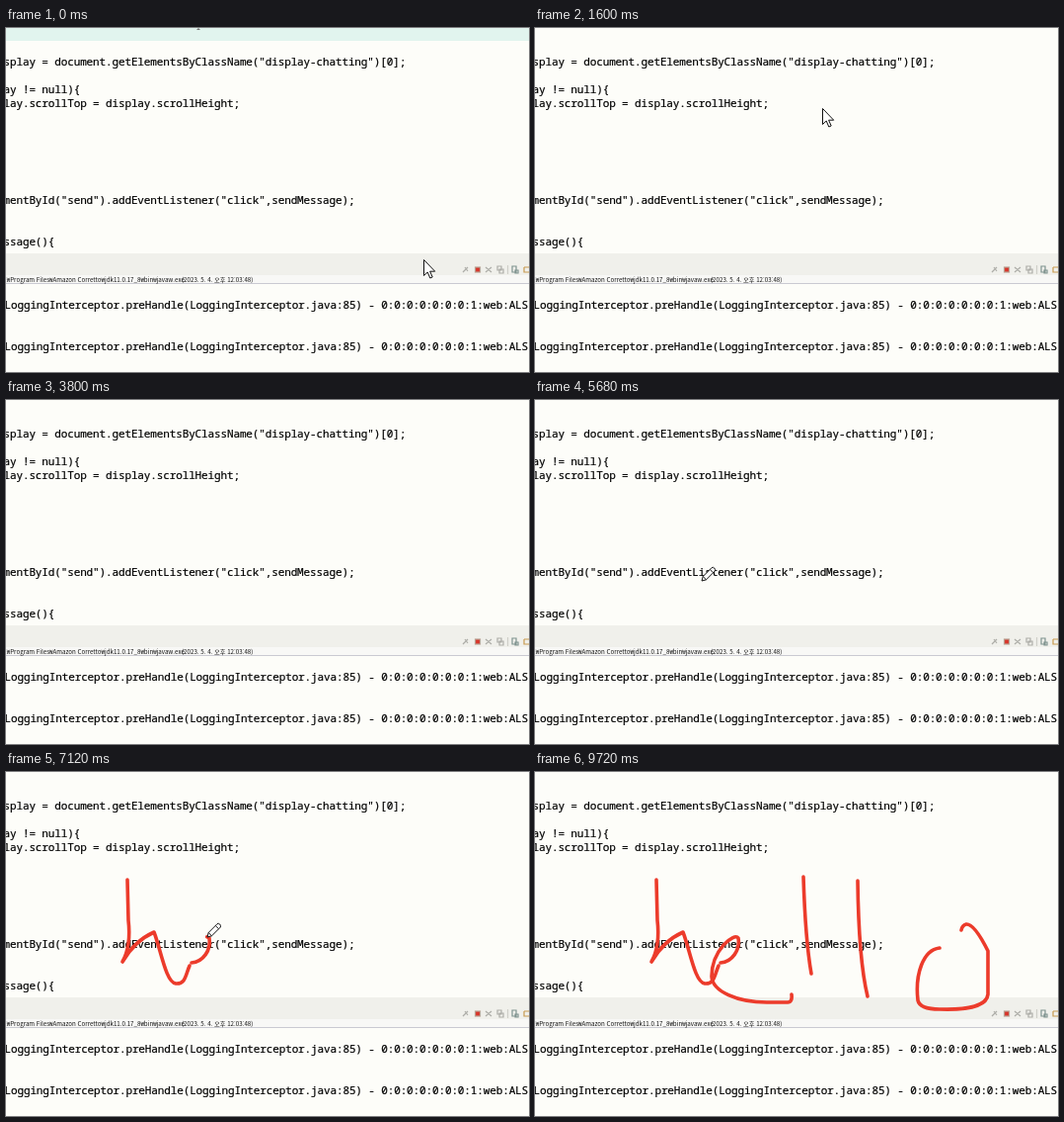
An HTML page that plays this animation: 530x348 px, repeating every 9.84 s.

```html
<!DOCTYPE html>
<html lang="ko">
<head>
<meta charset="utf-8">
<title>Writing over code</title>
<style>
  html, body { margin: 0; width: 100%; height: 100%; overflow: hidden; background: #fdfdf9; }
  svg { display: block; width: 530px; height: 348px; }
  text { white-space: pre; }
  .code { font: 11px "Noto Sans Mono", "DejaVu Sans Mono", monospace; letter-spacing: -.13px; stroke: #000; stroke-width: .2px; }
  .launch { font: 6.2px "Noto Sans CJK KR", "Noto Sans", sans-serif; fill: #111; }
  .ink { fill: none; stroke: #ec3b2b; stroke-width: 3.6; stroke-linecap: round; stroke-linejoin: round; }
  .pointer { fill: #fff; stroke: #111; stroke-linejoin: round; }
</style>
</head>
<body>
<svg viewBox="0 0 530 348">
  <g id="band">
    <rect width="530" height="13" fill="#e1f4ee"/>
    <path d="M193 2l2-2 2 2z" fill="#777"/>
  </g>

  <g class="code">
    <text x="-2.5" y="38">splay = document.getElementsByClassName("display-chatting")[0];</text>
    <text x="-2.5" y="66">ay != null){</text>
    <text x="-2.5" y="80">lay.scrollTop = display.scrollHeight;</text>
    <text x="-2.5" y="178">mentById("send").addEventListener("click",sendMessage);</text>
    <text x="-2.5" y="220">ssage(){</text>
  </g>

  <rect y="228" width="530" height="22" fill="#f0f0eb"/>
  <rect y="250" width="530" height="8" fill="#f8f8f6"/>
  <path d="M0 258.5H530" stroke="#cacad2"/>
  <g class="launch">
    <text x="-1" y="257">:₩Program Files₩Amazon Corretto₩jdk11.0.17_8₩bin₩javaw.exe</text>
    <text x="178" y="257">(2023. 5. 4. 오후 12:03:48)</text>
  </g>
  <g fill="none" stroke="#adada8" stroke-width="1.2">
    <path d="M463 247l5-5M465 242l3 4"/>
    <rect x="475.5" y="242" width="5" height="5" fill="#d8352a" stroke="#b9a294"/>
    <path d="M486 242l6 5M492 242l-6 5M498 241h4v4h-4zM500 244h4v4h-4z"/>
    <path d="M508.500 240v9" stroke="#cfcfc8"/>
    <path d="M513 241h4v6h-4zM516 245h3v3h-3z" stroke="#7f938f"/>
    <path d="M525 242h6M525 242v5h6" stroke="#c79a50"/>
  </g>

  <g class="code">
    <text x="-1.5" y="284">LoggingInterceptor.preHandle(LoggingInterceptor.java:85) - 0:0:0:0:0:0:0:1:web:ALS</text>
    <text x="-1.5" y="326">LoggingInterceptor.preHandle(LoggingInterceptor.java:85) - 0:0:0:0:0:0:0:1:web:ALS</text>
  </g>

  <!-- h, e, l, l, o -->
  <g class="ink">
    <path data-start="6240" data-end="6960" d="M123 109L124 150Q127 176 118 192Q130 171 150 162C157 180 162 213 172 214S182 205 186 196"/>
    <path data-start="7040" data-end="7440" d="M188 193C200 192 208 180 206 168C202 162 179 180 179 207C180 222 205 233 235 233H256Q261 233 260 225"/>
    <path data-start="7560" data-end="7680" d="M272 106Q274 170 280 204"/>
    <path data-start="7800" data-end="7960" d="M327 110Q328 190 337 227"/>
    <path data-start="8240" data-end="8800" d="M410 178C393 180 385 205 388 231Q390 240 410 240C440 241 458 236 459 225V181Q445 153 437 154Q433 155 432 160"/>
  </g>

  <path id="arrow" class="pointer" d="M.5 .5V16.500L4.200 13L6.800 19L9.200 18L6.600 12.200H11.700Z"/>
  <g id="pencil" class="pointer">
    <path d="M0 0L1.200-4.500L10-13.300Q11.500-14.300 12.700-13Q14-11.500 13.300-10L4.500-1.200Z"/>
    <path d="M8.300-11.500L11.500-8.300M1.200-4.500L4.500-1.200" fill="none"/>
  </g>
</svg>
<script>
const LOOP = 9840, TICK = 40;
const $ = id => document.getElementById(id);
const clamp = v => Math.min(1, Math.max(0, v));

const strokes = [...document.querySelectorAll(".ink path")].map(path => ({
  path, start: +path.dataset.start, end: +path.dataset.end, length: path.getTotalLength()
}));

function pointOn({ path, length }, f) {
  const { x, y } = path.getPointAtLength(length * f);
  return [x, y];
}

// The arrow sweeps in wide loops between two straight stretches.
const SWEEP_START = 1000, SWEEP_END = 2000;
function sweep(t) {
  const s = (t - SWEEP_START) / 1000;
  return [207 - 110 * Math.cos(5.37 * s - .78), 118 + 118 * Math.sin(9.67 * s + .16)];
}

// Waypoints: [time, x, y]
const arrowTrack = [
  [0, 423, 234], [440, 139, 100], [720, 139, 100], [840, ...sweep(SWEEP_START)],
  [SWEEP_END, ...sweep(SWEEP_END)], [2480, 274, 145], [3240, 120, 349]
];
const pencilTrack = [
  [5680, 169, 183], [6040, ...pointOn(strokes[0], 0)], [8080, 370, 212],
  ...strokes.flatMap(s => [[s.start, ...pointOn(s, 0)], [s.end, ...pointOn(s, 1)]])
].sort((a, b) => a[0] - b[0]);

function along(track, t) {
  const next = track.findIndex(p => p[0] > t);
  if (next <= 0) return track.at(next).slice(1);
  const [t0, x0, y0] = track[next - 1], [t1, x1, y1] = track[next];
  const f = (t - t0) / (t1 - t0);
  return [x0 + (x1 - x0) * f, y0 + (y1 - y0) * f];
}

function show(el, on) { el.style.display = on ? "" : "none"; }

function place(el, [x, y], on) {
  show(el, on);
  el.setAttribute("transform", `translate(${Math.round(x)} ${Math.round(y)})`);
}

function draw(now) {
  const t = Math.floor(now % LOOP / TICK) * TICK;
  show($("band"), t < TICK);

  const sweeping = t >= SWEEP_START && t < SWEEP_END;
  const resting = t >= 840 && t < SWEEP_START;
  const arrow = sweeping || resting ? sweep(Math.max(t, SWEEP_START)) : along(arrowTrack, t);
  place($("arrow"), arrow, t < 3240);

  let tip = along(pencilTrack, t);
  for (const s of strokes) {
    const f = clamp((t - s.start) / (s.end - s.start));
    show(s.path, f > 0);
    s.path.style.strokeDasharray = f < 1 ? `${s.length * f} 9999` : "none";
    if (f > 0 && f < 1) tip = pointOn(s, f);
  }
  place($("pencil"), tip, t >= 5600 && t < 9720);
}

const origin = performance.now();
function loop() {
  draw(performance.now() - origin);
  requestAnimationFrame(loop);
}
loop();
</script>
</body>
</html>
```
